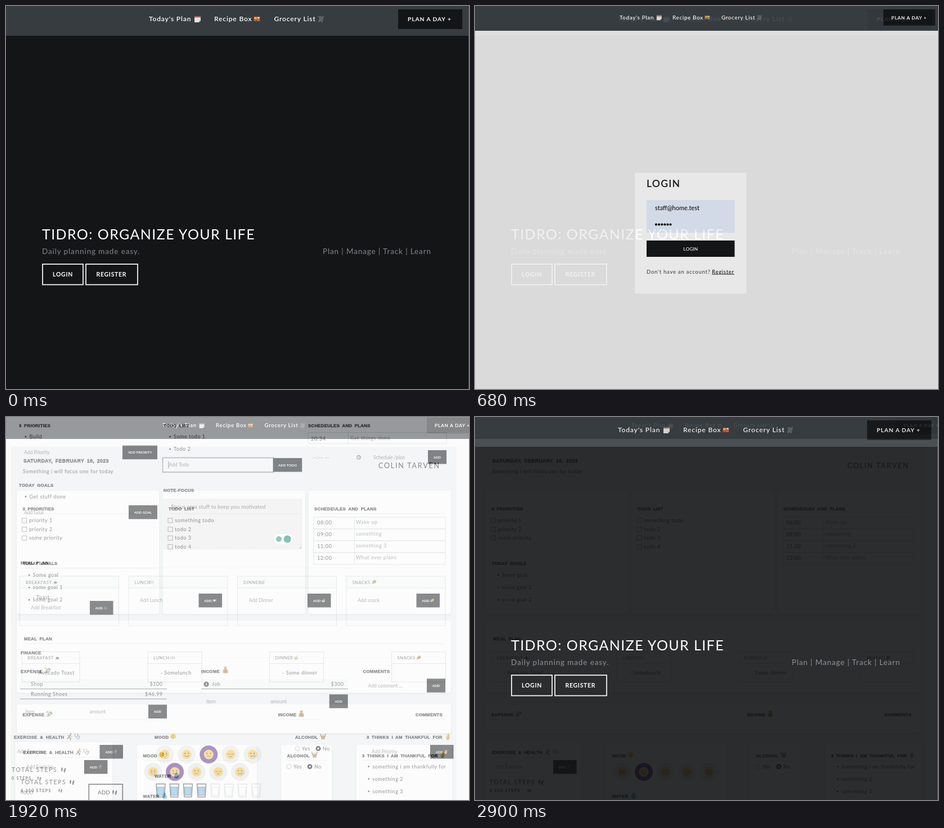
These frames come from a looping animation (823x681 px, 2.96 s). An HTML page:

```html
<!DOCTYPE html>
<html lang="en">
<head>
<meta charset="utf-8">
<title>Day planner</title>
<style>
html, body { margin: 0; width: 100%; height: 100%; overflow: hidden; background: #141517; }
svg { display: block; width: 823px; height: 681px; font-family: Lato, "Open Sans", sans-serif; }
text { white-space: pre; }
.title { font-size: 25px; letter-spacing: 1.4px; fill: #fff; }
.sub { font-size: 13.5px; letter-spacing: .88px; fill: #85868a; }
.cta { font-size: 10.5px; font-weight: 700; letter-spacing: .7px; fill: #fff; }
.head { font: 700 7.8px "Liberation Sans", sans-serif; letter-spacing: .3px; word-spacing: 2px; fill: #1c1d1f; stroke: #1c1d1f; stroke-width: .3px; }
.body { font-size: 9px; letter-spacing: .55px; fill: #333; }
.soft { font-size: 9px; letter-spacing: .55px; fill: #808285; }
.hint { font-size: 8.6px; fill: #77787a; }
.cap { font-size: 7.6px; letter-spacing: .5px; fill: #555; }
.btn { font-size: 6.1px; font-weight: 700; fill: #fff; text-anchor: middle; }
.time { font-size: 9.3px; letter-spacing: .5px; fill: #333; }
.steps { font-size: 10.5px; letter-spacing: 1.55px; fill: #222; }
.count { font-size: 7.3px; font-weight: 700; letter-spacing: 1.2px; fill: #222; }
.end { text-anchor: end; }
.card { fill: #fdfefe; filter: drop-shadow(0 1px 1px #0002); }
</style>
</head>
<body>
<svg id="stage" viewBox="0 0 823 681"></svg>
<script>
const INK = '#141517', BAR = '#363c40';

const text = (cls, x, y, s, more = '') => `<text class="${cls}" x="${x}" y="${y}" ${more}>${s}</text>`;
const rect = (x, y, w, h, fill, more = '') =>
  `<rect x="${x}" y="${y}" width="${w}" height="${h}" fill="${fill}" ${more}/>`;
const frame = (x, y, w, h, color, width = 1, more = '') =>
  rect(x, y, w, h, 'none', `stroke="${color}" stroke-width="${width}" ${more}`);
const circle = (x, y, r, fill, more = '') => `<circle cx="${x}" cy="${y}" r="${r}" fill="${fill}" ${more}/>`;
const line = (x1, y1, x2, y2, color = '#e6e8e8', width = 1) =>
  `<path d="M${x1} ${y1}L${x2} ${y2}" stroke="${color}" stroke-width="${width}"/>`;
const path = (d, fill, more = '') => `<path d="${d}" fill="${fill}" ${more}/>`;
const stroke = (d, color, width = 1) =>
  path(d, 'none', `stroke="${color}" stroke-width="${width}" stroke-linecap="round"`);
const each = (list, fn) => list.map(fn).join('');

// Small pictograms, drawn around 0,0 in a box of about 12 units
const icons = {
  cal: path('M-5-5H6V3L3 6H-5z', '#e6e3e2') + path('M-5-5H6V-2.6H-5z', '#a9605b') + path('M6 3L3 6V3z', '#aaa'),
  bento: rect(-6, -4.5, 12, 9, '#8c2f22') + rect(-5, -3.5, 5, 4, '#e9b44c') + rect(.8, -3.5, 4, 3, '#e8dccb') +
    rect(-5, 1.2, 4, 2.3, '#6d9a45') + rect(0, .5, 5, 3, '#dd7a35'),
  cart: stroke('M-5-4H3L2 2H-4M5-5L3 3.5H-4M-3-2H3M-3 0H2M-1-4V2', '#777b7e', .9) + circle(-3, 5, 1, '#777') + circle(2, 5, 1, '#777'),
  cup: path('M-4-1H3Q3 3 0 3H-1Q-4 3-4-1z', '#55504d') + stroke('M3 0Q6 0 3 2M-5 4H4M-1-4V-2', '#777', .8),
  plate: circle(0, 0, 3, '#ddd', 'stroke="#999" stroke-width=".8"') + stroke('M-5-4V4M5-4V4', '#999', .9),
  bowl: path('M-5 0H5Q4 5 0 5T-5 0', '#b9b2a4') + stroke('M-4-1Q0-4 4-1M1-2L5-5', '#c69a4c', 1.2),
  wrap: path('M-5 4Q-4-4 3-5Q7-3 4 1Q0 5-5 4', '#c99a5b') + stroke('M-2-2L3 2M0-4L5-1', '#6d7b3c', 1.4),
  cash: path('M-4 0L3-5L6-1L-1 5z', '#7c9c72') + circle(1, 0, 1.7, '#cfd8c2') + stroke('M-5-3L-2-4M-5 3L-3 4', '#a7835b', 1.4),
  bag: path('M-2-3H2Q6 1 4 5H-4Q-6 1-2-3', '#b58a4a') + path('M-3-6H3L1-3H-1z', '#a27535') + stroke('M1 0Q-2 0 0 1.5T-1 3', '#5c431e', .9),
  run: circle(2, -4.5, 1.4, '#a8774e') + stroke('M1-2L-1 1L2 3L1 6M-1 1L-4 4', '#5c6668', 1.5) + stroke('M-3-1L1-2L4 0', '#c07e3e', 1.3),
  scope: stroke('M-4-5Q-6 1-2 1Q2 0 0-5M-2 1Q-1 6 3 4V1', '#74777a', 1) + circle(3, 0, 1.8, '#a6abad'),
  glass: path('M-4-4H4L3 5H-3z', '#ddd6c9') + path('M-3.6-1H3.6L3 5H-3z', '#c1822f') + stroke('M-5-5L-3 1M5-5L3 1', '#594d43', 1),
  hands: path('M0-6Q3-2 3 2L1 6H-3L-4 2Q-1-2 0-6', '#e4ad44') + stroke('M0-5V5', '#b5802b', .7) + stroke('M-5-4L-4-3M5-4L4-3', '#d9b45a', 1),
  feet: path('M-4-4Q-1-6-1-2L-2 3H-4Q-5 0-4-4M2-3Q5-5 5-1L3 5H1Q0 1 2-3', '#4a4745'),
  drop: path('M0-6Q4 0 4 2A4 4 0 0 1-4 2Q-4 0 0-6', '#48a5d4')
};
const icon = (name, x, y, k = 1) => `<g transform="translate(${x} ${y}) scale(${k})">${icons[name]}</g>`;

const mouths = ['M-4 1Q0 7 4 1z', 'M-3.5 2Q0 5.5 3.5 2', 'M-3 3H3', 'M-2 4Q0 2.5 2 4', 'M-3 4Q0 1.5 3 4'];
function face(kind, x, y, k = 1) {
  const brown = '#6b4413';
  const eyes = kind == 3 ? stroke('M-5-1Q-3 1-1-1M1-1Q3 1 5-1', brown, 1)
    : each([-3, 3], ex => `<ellipse cx="${ex}" cy="-2" rx="1" ry="1.5" fill="${brown}"/>`);
  const mouth = kind ? stroke(mouths[kind], brown, 1.1) : path(mouths[0], '#fff', `stroke="${brown}" stroke-width=".8"`);
  const tear = kind == 4 ? path('M4 0Q7 4 4 5T4 0', '#55aee0') : '';
  return `<g transform="translate(${x} ${y}) scale(${k})">${circle(0, 0, 8.6, '#f3c144')}${eyes}${mouth}${tear}</g>`;
}
const moods = (x, y, step, chosen) => each([0, 1, 2, 3, 4], i =>
  circle(x + step * i, y, 16, i == chosen ? '#562b8e' : '#e4e6e6') + face(i, x + step * i, y));

const head = (x, y, s, ...names) => text('head', x, y, s) +
  each(names, ([name, ix]) => name == 'face' ? face(1, ix, y - 4, .58) : icon(name, ix, y - 4));
const body = (x, y, s) => text('body', x, y, s);
const hint = (x, y, s) => text('hint', x, y, s);
const bullet = (x, y, s) => circle(x, y, 1.4, '#333') + body(x + 6.5, y + 3.2, s);
const check = (x, y, s) => frame(x, y - 4, 8, 8, '#85888a') + body(x + 12.3, y + 3.2, s);
const radio = (x, y, s, on) => circle(x, y, 4, '#fff', `stroke="${on ? INK : '#aaa'}"`) +
  (on ? circle(x, y, 3, 'none', `stroke="${INK}" stroke-width="2.6"`) : '') + body(x + 8, y + 3.3, s);
const button = (x, y, w, s, name) => rect(x, y, w, 24.5, INK) +
  text('btn', name ? x + 16.5 : x + w / 2, y + 14.5, s) + (name ? icon(name, x + 28, y + 12.2, .65) : '');
const card = (x, y, w, h) => rect(x, y, w, h, '', 'rx="4" class="card"');
const meals = [['BREAKFAST', 'cup'], ['LUNCH', 'plate'], ['DINNER', 'bowl'], ['SNACKS', 'wrap']];

// Top bar: k scales the lettering, xs are the link positions
function nav(height, k, y, xs, bx, by, bw, bh, tx) {
  const links = [["Today's Plan", 'cal', 86], ['Recipe Box', 'bento', 76], ['Grocery List', 'cart', 83]];
  return rect(0, 0, 823, height, BAR) + rect(bx, by, bw, bh, INK) +
    `<g fill="#fff" font-size="${12 * k}" font-weight="600" letter-spacing="${.85 * k}">` +
    each(links, ([s, name, dx], i) => text('', xs[i], y, s) + icon(name, xs[i] + dx * k, y - 4 * k, k)) + '</g>' +
    `<g fill="#fff" font-size="${10.3 * k}" font-weight="700" letter-spacing="${.9 * k}">${text('', tx, y, 'PLAN A DAY +')}</g>`;
}

function home() {
  return rect(0, 0, 823, 681, INK) + nav(53, 1, 27, [254, 370, 476.5], 697, 6, 114, 35, 714) +
    text('title', 64, 414.5, 'TIDRO: ORGANIZE YOUR LIFE') +
    text('sub', 64, 440.5, 'Daily planning made easy.') +
    text('sub', 563, 440.5, 'Plan | Manage | Track | Learn') +
    frame(65, 459, 72, 36.5, '#fff', 1.7) + text('cta', 83, 481, 'LOGIN') +
    frame(142, 459, 92, 36.5, '#fff', 1.7) + text('cta', 160.5, 481, 'REGISTER') +
    rect(822, 0, 1, 681, '#55585a');
}

function login() {
  return rect(0, 0, 823, 681, '#f0f0f0') + nav(44, .813, 23.7, [257, 351, 438], 726, 6, 92, 28.5, 740) +
    rect(284.3, 296.3, 198, 215, '#fff') +
    text('', 305, 321.5, 'LOGIN', `font-size="17.5" font-weight="600" letter-spacing="1.3" fill="${INK}"`) +
    rect(305, 345, 156.5, 58, '#e8f0fe') +
    text('', 320, 362.7, 'staff@home.test', 'font-size="11" fill="#000"') +
    each([0, 1, 2, 3, 4, 5], i => circle(322 + 5.1 * i, 388.5, 2.1, '#000')) +
    rect(305, 417, 156.5, 29, INK) +
    text('', 383.2, 434.5, 'LOGIN', 'font-size="8.4" font-weight="600" fill="#fff" text-anchor="middle"') +
    `<g font-size="9.6" letter-spacing=".7">${text('', 305, 475.5, "Don't have an account?", 'fill="#3c3d3f"')}` +
    text('', 421, 475.5, 'Register', 'fill="#111" text-decoration="underline"') + '</g>';
}

function glass(x, full) {
  const color = full ? '#34383b' : '#cfd1d2';
  return (full ? path(`M${x - 6.3} 658H${x + 6.3}L${x + 5} 673H${x - 5}z`, '#6fb6de') : '') +
    stroke(`M${x - 8} 652.5H${x + 8}L${x + 6.5} 675.5H${x - 6.5}z`, color, 1.4) +
    stroke(`M${x - 6} 658H${x + 6}L${x + 5} 672.5H${x - 5}z`, color, .7);
}

function editor() {
  const cells = each(meals, ([s, name], i) => {
    const x = 24.5 + 193.5 * i, y = i ? 314 : 327;
    const entry = ['Breakfast', 'Lunch', 'Dinner', 'snack'][i];
    return rect(x, 283, 176, 21, '#f5f6f6') + frame(x, 283, 176, 88, '#d4d6d6') + line(x, 304, x + 176, 304, '#d4d6d6') +
      text('cap', x + 10.5, 296.5, s) + icon(name, x + [63.5, 40, 44.5, 49][i], 293.5, .75) +
      hint(x + 20, y + 15.3, 'Add ' + entry) + button(x + 124.5, y, 41.5, 'ADD', name);
  });
  return rect(0, 0, 823, 681, '#fbfbfb') +
    head(23, 17.5, '3 PRIORITIES') + bullet(35, 35, 'Build') + hint(32, 66, 'Add Priority') + button(207, 50.7, 62, 'ADD PRIORITY') +
    head(280, 17.5, 'TODO LIST') + bullet(291.5, 35, 'Some todo 1') + bullet(291.5, 57.2, 'Todo 2') +
    rect(278.5, 72.5, 197, 25.5, '#fff', 'stroke="#9b9d9f" stroke-width="2"') +
    line(289, 79, 289, 91, '#222', .8) + hint(289.5, 88.3, 'Add Todo') + button(474.7, 73, 51.5, 'ADD TODO') +
    head(537, 17.5, 'SCHEDEULES AND PLANS') + frame(537, 27.5, 246, 20, '#d4d6d6') + line(608.5, 27, 608.5, 48, '#d4d6d6') +
    text('time', 542, 42.3, '20:34') + text('soft', 612, 40.5, 'Get things done') +
    text('hint', 545, 75, '--:-- --', 'letter-spacing=".8"') + circle(627, 71.7, 3.4, 'none', 'stroke="#333"') +
    stroke('M627 70V72H628.5', '#333', .8) + hint(653, 74.8, 'Schedule /plan') + button(750, 59, 33, 'ADD') +
    head(23, 123.5, 'TODAY GOALS') + bullet(35, 141.5, 'Get stuff done') + hint(32, 172.5, 'Add Goal') + button(218, 157, 51, 'ADD GOAL') +
    head(280, 133.3, 'NOTE-FOCUS') + frame(280.5, 146, 245, 89, '#d2d5d2', 1, 'stroke-dasharray="2 1"') +
    rect(281, 146.5, 244, 88, '#e9eae8') + stroke('M521 234L525 230M523.5 234L525 232.5', '#777', .7) +
    text('', 293.5, 162.5, 'Focus area stuff to keep you motivated', 'font-size="9.9" fill="#55575a"') +
    rect(476, 208, 34, 18, '#fff', 'rx="9"') + circle(485, 217, 5, '#2a9382') + circle(500.2, 217, 6.6, '#16806f') +
    head(26, 262, 'MEAL PLAN') + line(26, 268, 781, 268, '#f0f1f1') + cells + body(47.5, 323.7, '- Toast') +
    head(26, 422, 'FINANCE') + line(26, 428, 781, 428, '#f0f1f1') +
    head(26, 454.5, 'EXPENSE', ['cash', 74]) + head(347, 454.5, 'INCOME', ['bag', 390]) + head(634.5, 454.5, 'COMMENTS') +
    each([25, 347], x => rect(x, 466, 261, 17, '#f3f4f4') + line(x, 483.5, x + 261, 483.5, '#55585a')) +
    line(25, 501.3, 286, 501.3, '#55585a') +
    body(44, 477.7, 'Shop') + text('body end', 278.5, 477.7, '$100') +
    body(44, 495.5, 'Running Shoes') + text('body end', 278.5, 495.5, '$46.99') +
    circle(356, 475, 4.6, '#222') + text('btn', 356, 477.4, '$') + body(366, 477.7, 'Job') + text('body end', 600.5, 477.7, '$300') +
    hint(34, 526.5, 'item') + hint(148.5, 526.5, 'amount') + button(253, 511.5, 33, 'ADD') +
    hint(356, 508.5, 'item') + hint(470, 508.5, 'amount') + button(574.7, 493.2, 33, 'ADD') +
    hint(643.5, 480.5, 'Add comment ...') + button(748, 465.3, 33, 'ADD') +
    head(14, 572, 'EXERCISE &amp; HEALTH', ['run', 113], ['scope', 127]) + hint(20, 598, 'Add Exercise') +
    button(166.5, 583, 41.5, 'ADD', 'run') +
    text('steps', 10, 631, 'TOTAL STEPS') + icon('feet', 102, 627.5, .9) +
    text('count', 10, 645.3, '0 STEPS') + icon('feet', 59, 642.5, .7) +
    text('', 25, 671, '4000', 'font-size="10" fill="#66686a"') + frame(147.3, 653, 60, 31, INK, 1.6) +
    text('', 163, 671, 'ADD', 'font-size="9.8" font-weight="600" fill="#222"') + icon('feet', 193, 667.5, .9) +
    head(264, 572, 'MOOD', ['face', 297]) + moods(282.3, 600, 39, 2) +
    head(264, 640.7, 'WATER', ['drop', 303]) + each([0, 1, 2, 3, 4, 5, 6, 7], i => glass(275 + 24.2 * i, i < 4)) +
    head(514, 572, 'ALCOHOL', ['glass', 563.5]) + radio(518, 589.5, 'Yes') + radio(555, 589.5, 'No', true) +
    head(641, 572, '3 THINKS I AM THANKFUL FOR', ['hands', 786]) + hint(650, 598, 'Add Priority') +
    button(754, 583, 41.5, 'ADD', 'hands');
}

function today() {
  const edge = '#d3d7d8';
  const cells = each(meals, ([s, name], i) => {
    const x = [28.5, 252, 468.5, 685.5][i], w = i ? 96 : 102.5;
    return frame(x, 417.5, w, 53.5, edge) + line(x, 438.5, x + w, 438.5, edge) +
      text('cap', x + 10, 431, s) + icon(name, x + [63, 44, 47, 48][i], 428, .75);
  });
  const plans = each(['Wake up', 'something', 'something 3', 'What ever plans'], (s, i) =>
    frame(547, 178 + 21 * i, 234, 21, edge) +
    text('time', 553, 191.3 + 21 * i, ['08:00', '09:00', '11:00', '12:00'][i]) + text('soft', 622, 189.7 + 21 * i, s));
  return rect(0, 0, 823, 681, '#fcfcfc') + rect(9, 53, 792, 628, '#ecf1f3') +
    nav(39, .81, 18.3, [278, 373, 459.5], 748, 1, 75, 28.5, 762) +
    text('head', 31, 80.5, 'SATURDAY, FEBRUARY 18, 2023', 'style="font-size:8.9px"') +
    text('body', 30, 100, 'Something i will focus one for today') +
    text('', 662, 91.2, 'COLIN TARVEN', 'font-size="12.5" letter-spacing="1.8" fill="#1b1c1e"') +
    each([19, 278.5, 537.7], x => card(x, 131, 253.3, 219.5) + line(x + 10, 172, x + 244, 172)) +
    head(29.5, 166.3, '3 PRIORITIES') + each(['priority 1', 'priority 2', 'some priority'], (s, i) => check(28.7, 184 + 15.6 * i, s)) +
    head(30, 263, 'TODAY GOALS') + line(29, 269, 265, 269) +
    each(['Some goal', 'some goal 1', 'some goal 2'], (s, i) => bullet(41.3, 281 + 22.1 * i, s)) +
    head(289, 166.3, 'TODO LIST') + each(['something todo', 'todo 2', 'todo 3', 'todo 4'], (s, i) => check(288, 184 + 15.6 * i, s)) +
    head(548, 166.3, 'SCHEDEULES AND PLANS') + plans + line(619.5, 178, 619.5, 262, edge) +
    card(19, 361.5, 772, 129) + head(32, 397, 'MEAL PLAN') + line(30, 403, 781, 403) + cells +
    body(51, 457.8, '- Avocado Toast') + body(274.5, 457.8, '- Somelunch') + body(491, 457.8, '- Some dinner') +
    card(19, 511, 772, 51.5) + head(29.5, 532, 'EXPENSE', ['cash', 77]) + head(483.5, 532, 'INCOME', ['bag', 525]) +
    head(728, 532, 'COMMENTS') + line(29, 538, 265, 538) + line(483, 538, 560, 538) + line(728, 538, 781, 538) +
    card(16.5, 578, 173, 120) + head(30.5, 599.3, 'EXERCISE &amp; HEALTH', ['run', 129], ['scope', 143]) + line(30, 605, 180, 605) +
    hint(36, 625, 'Add Exercise') + button(139, 610, 41.5, 'ADD', 'run') +
    text('steps', 26, 653, 'TOTAL STEPS') + icon('feet', 117, 649.5, .9) +
    text('count', 26, 667, '4,350 STEPS') + icon('feet', 96.5, 664.3, .7) +
    card(232.5, 583, 213.5, 120) + head(243.5, 604.5, 'MOOD', ['face', 276.5]) + line(243, 610.5, 436, 610.5) +
    moods(261.5, 631, 38.6, 1) + head(243.5, 677, 'WATER', ['drop', 282]) +
    card(489, 583, 90, 120) + head(499.5, 604.5, 'ALCOHOL', ['glass', 548.5]) + line(499, 610.5, 570, 610.5) +
    radio(503, 621.5, 'Yes') + radio(540, 621.5, 'No', true) +
    card(622.5, 583, 171, 120) + head(633, 604.5, '3 THINKS I AM THANKFUL FOR', ['hands', 776.5]) + line(633, 610.5, 784, 610.5) +
    each(['something i am thankfully for', 'something 2', 'something 3'], (s, i) => bullet(644.7, 621.5 + 22.1 * i, s));
}

const stage = document.getElementById('stage');
stage.innerHTML = each([home, login, editor, today], screen => `<g>${screen()}</g>`);
const layers = [...stage.children];

// Each screen rests 200 ms, then the next one fades in by tenths every 60 ms
const SLOT = 740, REST = 200, STEP = 60;
const start = performance.now();
function draw() {
  const t = (performance.now() - start) % (SLOT * 4);
  const now = Math.floor(t / SLOT), fade = t % SLOT - REST;
  const alpha = fade < 0 ? 0 : (Math.floor(fade / STEP) + 1) / 10;
  const opacity = [0, 0, 0, 0];
  opacity[now] = now < 3 ? 1 : 1 - alpha;
  opacity[(now + 1) % 4] = now < 3 ? alpha : 1;
  layers.forEach((g, i) => {
    g.style.display = opacity[i] ? '' : 'none';
    g.style.opacity = opacity[i];
  });
  requestAnimationFrame(draw);
}
draw();
</script>
</body>
</html>
```
